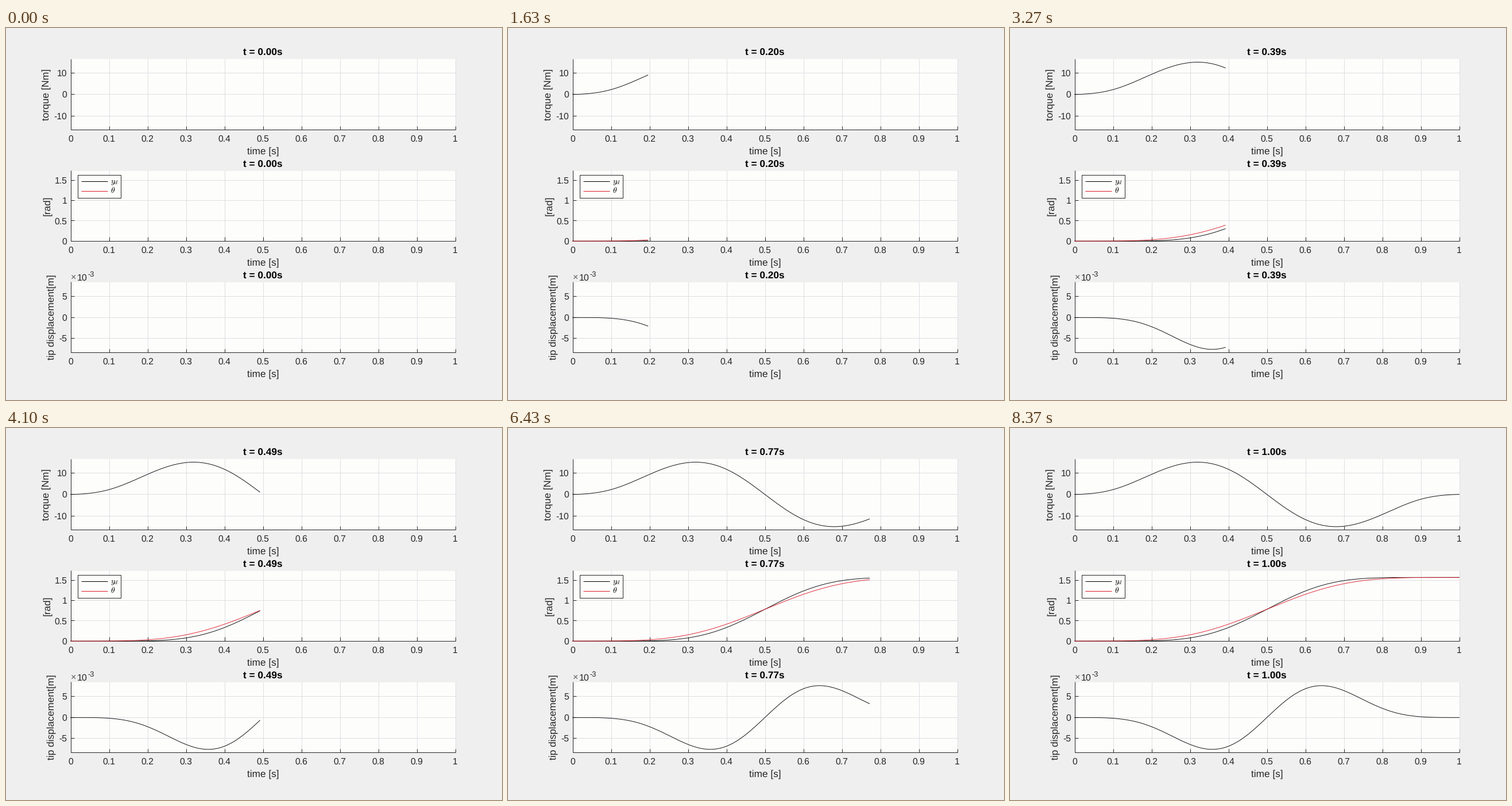
Write a matplotlib script that moves like this. It is 864x648 px and loops after 8.41 s.

```python
from math import comb, pi

import matplotlib.pyplot as plt
import numpy as np
from matplotlib.animation import FuncAnimation
from matplotlib.patches import Rectangle

plt.rcParams["font.family"] = "Liberation Sans"
plt.rcParams["mathtext.fontset"] = "cm"
plt.rcParams["text.hinting"] = "none"

W, H, DPI = 864, 648, 100
PX = 72 / DPI                    # one pixel in points
LEFT, WIDTH = 112.5, 670
FRAMES, INTERVAL = 290, 29       # 8410 ms per loop
STEPS = 250                      # samples in one simulated second
INK, GRID, RED, PAPER = "#262626", "#dfdfe4", "#dc1a26", "#fdfdfc"

# Rest-to-rest motion of a flexible link: smooth polynomial from 0 to pi/2.
t = np.linspace(0, 1, STEPS + 1)
u, s = t * (1 - t), 1 - 2 * t
y_d = pi / 2 * sum(comb(15, j) * t**j * (1 - t) ** (15 - j) for j in range(8, 16))
gain = 7 * 51480 * pi / 2
acc = gain * s * u**6                                            # 2nd derivative
acc2 = gain * s * u**4 * (30 - 156 * u)                          # 4th
acc3 = gain * s * u**2 * (360 - 5280 * u + 17160 * u**2)         # 6th
torque = acc + 0.0039 * acc2 + 1.826e-6 * acc3
shape = acc + 6e-4 * acc2
tip = -7.6 * shape / shape.max()                                 # in mm
theta = y_d - 0.012 * tip

fig = plt.figure(figsize=(W / DPI, H / DPI), dpi=DPI, facecolor="#efefef")
ax = fig.add_axes([0, 0, 1, 1])
ax.set_xlim(0, W)
ax.set_ylim(H, 0)
ax.axis("off")


def text(x, y, label, size=15.7, ha="center", **kw):
    kw.setdefault("color", INK)
    return ax.text(x, y, label, fontsize=size * PX, ha=ha, va="baseline",
                   rotation_mode="anchor", **kw)


def segment(x0, y0, x1, y1, color=INK, z=2):
    # Snapping rounds to the next row, so aim half a pixel higher.
    ax.plot([x0, x1], [y0 - 0.5, y1 - 0.5], color=color, lw=PX, zorder=z,
            solid_capstyle="butt")


def panel(top, bottom, zero, scale, ticks, ylabel, label_x):
    """Draw axes, grid and labels; return the title."""
    right = LEFT + WIDTH
    ax.add_patch(Rectangle((LEFT, top), WIDTH, bottom - top,
                           fc=PAPER, ec="none", zorder=0))
    for k in range(11):
        x = LEFT + WIDTH * k / 10
        if k:
            segment(x, top, x, bottom, GRID, 1)
        segment(x, bottom, x, bottom - 6.5)
        text(x, bottom + 20.8, f"{k / 10:g}")
    for v in ticks:
        y = zero - scale * v
        if y < bottom - 1:
            segment(LEFT, y, right, y, GRID, 1)
        segment(LEFT, y, LEFT + 6.5, y)
        text(106.5, y + 5.5, f"{v:g}", ha="right")
    segment(LEFT, top, LEFT, bottom)
    segment(LEFT, bottom, right, bottom)
    middle = LEFT + WIDTH / 2
    text(middle, bottom + 42, "time [s]", 17.2)
    text(label_x, (top + bottom) / 2, ylabel, 17.2, rotation=90)
    return text(middle, top - 6, "", 17.2, weight="bold", color="black")


def curve(values, zero, scale, color="black"):
    line, = ax.plot([], [], color=color, lw=0.9 * PX, zorder=3)
    return line, zero - scale * values


titles = [
    panel(54.3, 177.5, 115.7, 3.74, (10, 0, -10), "torque [Nm]", 74.5),
    panel(248.5, 371.2, 371.2, 70.6, (1.5, 1, 0.5, 0), "[rad]", 76.5),
    panel(442.8, 565.5, 504.3, 7.3, (5, 0, -5), "tip displacement[m]", 83.5),
]
curves = [
    curve(torque, 115.7, 3.74),
    curve(y_d, 371.2, 70.6),
    curve(theta, 371.2, 70.6, RED),
    curve(tip, 504.3, 7.3),
]

# Axis multiplier
text(113, 439.5, "×", 16, "left", color="#5a5a5a")
text(124, 439.5, "10", 16, "left")
text(142, 432.5, "-3", 12.8, "left")

# Legend
ax.add_patch(Rectangle((125, 256), 75, 40, fc=PAPER, ec=INK, lw=PX, zorder=4))
for y, color, name in ((267.5, "black", "$y_d$"), (284.5, RED, r"$\theta$")):
    segment(131, y, 177, y, color, 5)
    text(182, y + 3.5, name, 14, "left", color="black", zorder=5)


def update(i):
    n = min(int((i + 1) * INTERVAL * 0.03), STEPS)
    for title in titles:
        title.set_text(f"t = {n / STEPS:.2f}s")
    for line, y in curves:
        line.set_data(LEFT + WIDTH * t[:n + 1], y[:n + 1])
    return titles + [line for line, _ in curves]


anim = FuncAnimation(fig, update, frames=FRAMES, interval=INTERVAL,
                     repeat=True, repeat_delay=0)
plt.show()
```
